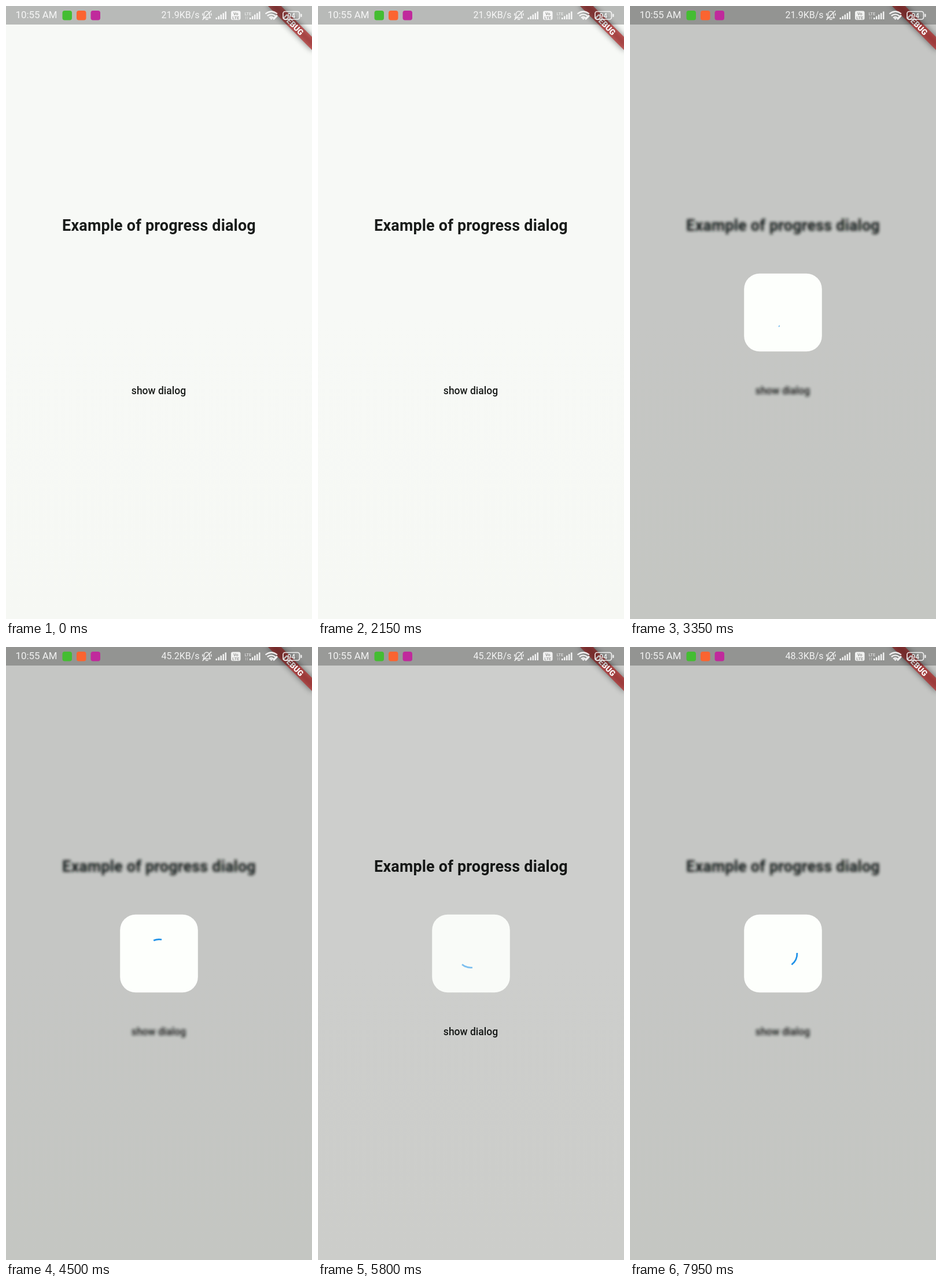
Animation of 529x1058 px, one loop 8 s. Source, as an HTML page:

```html
<!DOCTYPE html>
<html lang="en">
<head>
<meta charset="utf-8">
<title>Progress dialog</title>
<style>
  html, body { margin: 0; width: 100%; height: 100%; overflow: hidden; background: #f7f9f6; }
  svg { display: block; width: 100%; height: 100%; }
  text { font-family: Roboto, sans-serif; }
</style>
</head>
<body>
<svg viewBox="0 0 529 1058" xmlns="http://www.w3.org/2000/svg">
  <defs>
    <linearGradient id="page" x2="0" y2="1">
      <stop offset=".5" stop-color="#f7f9f6"/>
      <stop offset="1" stop-color="#f6f8f4"/>
    </linearGradient>
    <filter id="blur" filterUnits="userSpaceOnUse" x="0" y="300" width="529" height="450">
      <feGaussianBlur stdDeviation="2.7"/>
    </filter>
    <filter id="soft" x="-30%" y="-200%" width="160%" height="500%">
      <feGaussianBlur stdDeviation="5.3"/>
    </filter>
  </defs>

  <rect width="529" height="1058" fill="url(#page)"/>
  <g id="content" fill="#191c1a" text-anchor="middle">
    <text x="264.5" y="387.5" font-size="26.92" font-weight="700" letter-spacing=".2">Example of progress dialog</text>
    <text x="264" y="669.7" font-size="17.5" font-weight="500">show dialog</text>
  </g>

  <rect id="barrier" width="529" height="1058" opacity="0"/>
  <rect id="panel" x="197.2" y="461.7" width="134.6" height="134.6" rx="27" fill="#fdfffc" opacity="0"/>
  <path id="arc" fill="none" stroke="#1f92e8" stroke-width="2.7" opacity="0"/>

  <g transform="translate(529 0) rotate(45)">
    <rect x="-53.8" y="37.7" width="107.7" height="16.1" opacity=".5" filter="url(#soft)"/>
    <rect x="-53.8" y="37.7" width="107.7" height="16.1" fill="#b71c1c" fill-opacity=".627"/>
    <text y="50.6" font-size="13.7" font-weight="900" fill="#fff" text-anchor="middle">DEBUG</text>
  </g>

  <rect width="529" height="32" opacity=".255"/>
  <rect x="97.5" y="8" width="16.5" height="16.5" rx="4" fill="#44bd32"/>
  <rect x="122" y="8" width="16.5" height="16.5" rx="4" fill="#fb6430"/>
  <rect x="146.5" y="8" width="16.5" height="16.5" rx="4" fill="#c02a9c"/>

  <g fill="#fff" opacity=".88">
    <text x="16.5" y="21.3" font-size="16.9">10:55 AM</text>
    <text id="speed" x="268.5" y="21.3" font-size="16">21.9KB/s</text>
    <g fill="none" stroke="#fff" stroke-width="1.5" stroke-linecap="round" stroke-linejoin="round">
      <path d="M341 20.5h12.5l-1.8-2.5v-4a4.7 4.7 0 0 0-9.4 0v4zM345.5 23.3h3.5M340 23.5 354.5 8.5M339.8 13v3M354.8 13v3"/>
    </g>
    <path id="bars"/>
    <rect x="389" y="8.5" width="16.5" height="15.5" rx="3"/>
    <g fill="#a9aaa8" font-size="7.2" font-weight="900" text-anchor="middle">
      <text x="397.2" y="15.8">Vo</text>
      <text x="397.2" y="22.8">LTE</text>
    </g>
    <text x="412.5" y="15.6" font-size="7.4">LTE</text>
    <path d="M414.5 18v5M417.5 18v5" stroke="#fff" opacity=".45"/>
    <g fill="none" stroke="#fff" stroke-width="2.2">
      <path d="M448.5 13.5q10.2-8 20.4 0M451.8 17q6.9-5.2 13.8 0M455 20.3q3.7-2.8 7.4 0"/>
      <path d="M463 22l5-5" stroke-width="3.2" stroke-linecap="round"/>
    </g>
    <path d="M455.5 20.5h6.4l-3.2 3.5z"/>
    <rect x="479" y="9.5" width="28.5" height="13.5" rx="3.5" fill="none" stroke="#fff" stroke-width="1.7"/>
    <rect x="509.3" y="13.5" width="2.2" height="5.5" rx="1"/>
    <text x="493.3" y="20.6" font-size="12" font-weight="500" text-anchor="middle">94</text>
  </g>
</svg>
<script>
const LOOP = 8000, STEP = 50, FADE = 150;
// spin: spinner clock starts; show / hide: fades begin
const dialogs = [
  { spin: 2100, show: 2160, hide: 5735 },
  { spin: 6938, show: 6993, hide: Infinity }
];
const $ = id => document.getElementById(id);
const clamp = x => Math.min(1, Math.max(0, x));

// cubic-bezier(.4, 0, .2, 1)
function fastOutSlowIn(x) {
  if (x <= 0 || x >= 1) return clamp(x);
  let lo = 0, hi = 1, s;
  for (let i = 0; i < 20; i++) {
    s = (lo + hi) / 2;
    const u = 1 - s;
    if (1.2 * u * u * s + 0.6 * u * s * s + s * s * s < x) lo = s; else hi = s;
  }
  return s * s * (3 - 2 * s);
}

function arcPath(ms) {
  const path = ms / 1333 % 1, turn = ms / 2222 % 1;
  const head = fastOutSlowIn(path * 2), tail = fastOutSlowIn(path * 2 - 1);
  const from = Math.PI * (-0.5 + tail * 1.5 + turn * 2 + path * 0.5);
  const sweep = Math.max((head - tail) * 1.5 * Math.PI, 0.001);
  const r = 24.4;
  const at = a => `${264.5 + r * Math.cos(a)} ${529 + r * Math.sin(a)}`;
  return `M${at(from)}A${r} ${r} 0 ${sweep > Math.PI ? 1 : 0} 1 ${at(from + sweep)}`;
}

function bars(x) {
  let d = '';
  for (let i = 0; i < 5; i++) {
    const h = 3 + i * 2.6;
    d += `M${x + i * 4} 23v${-h}h2.5v${h}z`;
  }
  return d;
}

function render(t) {
  const dialog = dialogs.find(d => t >= d.show && t < d.hide + FADE);
  const v = dialog ? clamp((t - dialog.show) / FADE) * (1 - clamp((t - dialog.hide) / FADE)) : 0;
  $('barrier').setAttribute('opacity', 0.203 * (1 - (1 - v) ** 2.3));
  $('panel').setAttribute('opacity', 1 - (1 - v) ** 3);
  $('arc').setAttribute('opacity', v);
  if (dialog) $('arc').setAttribute('d', arcPath(t - dialog.spin));
  // the backdrop is blurred only while the dialog is fully opaque
  $('content').setAttribute('filter', v === 1 ? 'url(#blur)' : 'none');
  $('speed').textContent = (t < 3700 ? '21.9' : t < 7300 ? '45.2' : '48.3') + 'KB/s';
}

$('bars').setAttribute('d', bars(362.5) + bars(421));
const begin = performance.now();
function tick() {
  const t = (performance.now() - begin) % LOOP;
  render(Math.floor(t / STEP) * STEP);
  requestAnimationFrame(tick);
}
tick();
</script>
</body>
</html>
```
